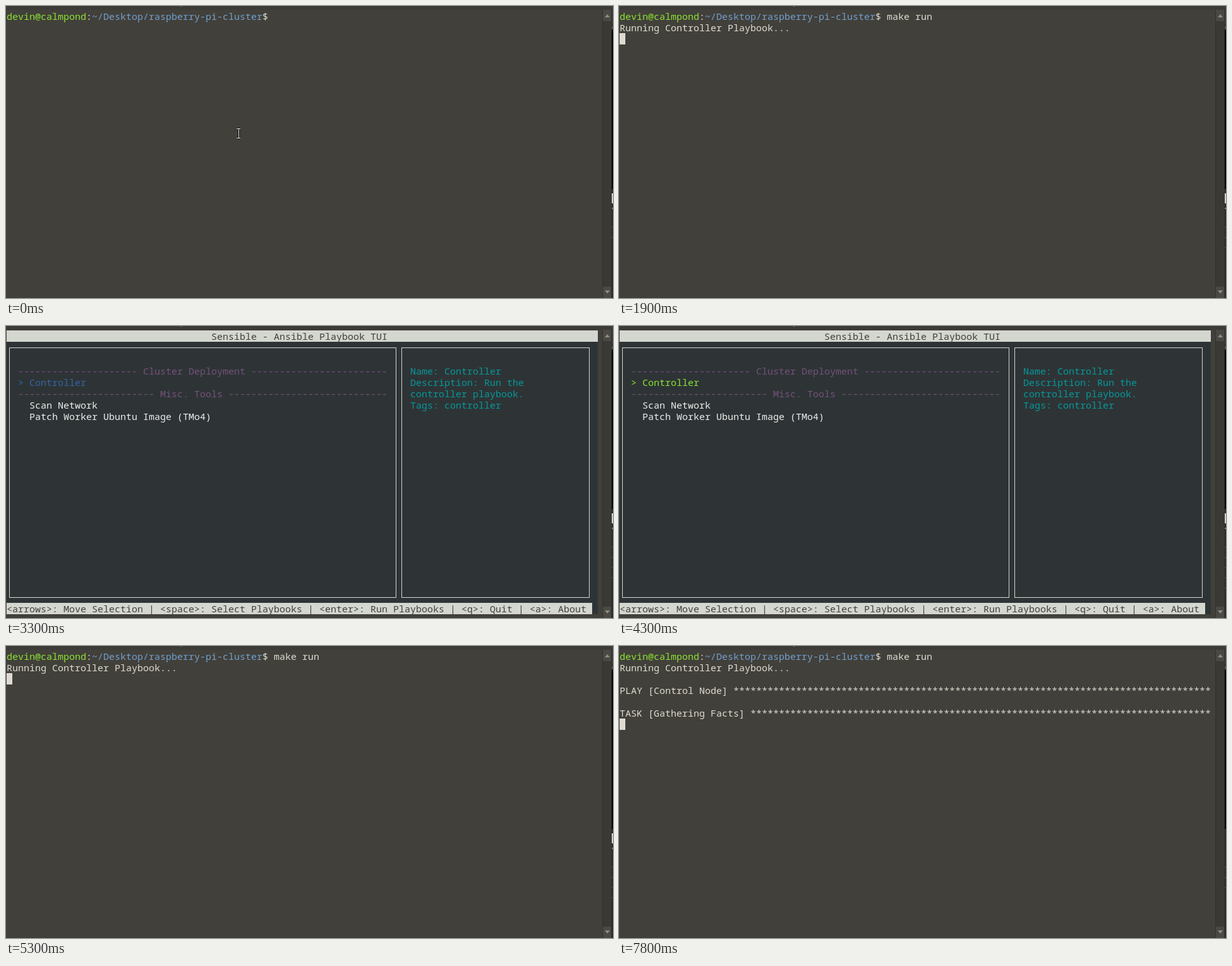
Recreate the animation shown at these times as an HTML page. Size 961 by 463 pixels, loop 8000 ms.

```html
<!DOCTYPE html>
<html lang="en">
<head>
<meta charset="utf-8">
<title>Terminal</title>
<style>
html, body { margin: 0; width: 100%; height: 100%; overflow: hidden; background: #3c3b37; }
#stage { position: relative; width: 961px; height: 463px; overflow: hidden; background: #3c3b37; }
#stage * { position: absolute; box-sizing: border-box; }
#stage span { position: static; }
.loop { animation: 8s step-end infinite; }

/* Character grid: 9 x 18 px cells starting at 1, 7 */
pre {
  margin: 0; left: 1px; color: #dfdbd2; white-space: pre;
  font: 15px/18px "Noto Sans Mono", monospace;
  font-variant-ligatures: none; font-kerning: none;
}
#term { left: 0; top: 6px; width: 945px; height: 456px; background: #42403a; }
#term pre { top: 1px; }
.user { color: #8ae234; }
.path { color: #729fcf; }
#stage #term .cmd { left: 424px; overflow: hidden; animation-name: type; }
#stage #term .run { top: 19px; animation-name: run; }
#stage #term .play { top: 55px; animation-name: play; }
#cursor { width: 9px; height: 18px; background: #dfdbd2; animation-name: cursor; }
#mouse { left: 363px; top: 192px; animation-name: mouse; }

@keyframes type {
  0% { width: 0 }
  5% { width: 9px }
  7.5% { width: 18px }
  8.75% { width: 36px }
  13.75% { width: 45px }
  18.75% { width: 54px }
  20% { width: 63px }
  21.25%, 100% { width: 72px }
}
@keyframes run { 0% { visibility: hidden } 23.75%, 100% { visibility: visible } }
@keyframes play { 0% { visibility: hidden } 73.75%, 100% { visibility: visible } }
@keyframes mouse { 0% { visibility: visible } 5%, 100% { visibility: hidden } }
@keyframes cursor {
  0% { left: 424px; top: 7px; visibility: hidden }
  5% { left: 433px; top: 7px; visibility: visible }
  7.5% { left: 442px; top: 7px; visibility: visible }
  8.75% { left: 460px; top: 7px; visibility: visible }
  13.75% { left: 469px; top: 7px; visibility: visible }
  18.75% { left: 478px; top: 7px; visibility: visible }
  20% { left: 487px; top: 7px; visibility: visible }
  21.25% { left: 496px; top: 7px; visibility: visible }
  23.75% { left: 1px; top: 43px; visibility: visible }
  25% { left: 1px; top: 43px; visibility: hidden }
  66.25% { left: 1px; top: 43px; visibility: visible }
  73.75% { left: 1px; top: 115px; visibility: hidden }
  81.25% { left: 1px; top: 115px; visibility: visible }
  88.75% { left: 1px; top: 115px; visibility: hidden }
  96.25%, 100% { left: 1px; top: 115px; visibility: visible }
}

#tui { left: 1px; top: 7px; width: 936px; height: 450px; background: #2e3436; animation-name: tui; }
#tui pre { left: 18px; color: #eeeeec; }
#tui .bar { left: 0; height: 18px; background: #d3d7cf; color: #42403a; }
.box { top: 27px; height: 397px; border: 1px solid #d3d7cf; }
#tui .sep { color: #75507b; }
#tui .sep.first { animation-name: sep; }
#tui .pick { animation-name: pick; }
#tui .info { left: 639px; top: 55px; color: #06989a; }
#stage .before { animation-name: before; }
#stage .after { animation-name: after; }
@keyframes tui { 0% { visibility: hidden } 25% { visibility: visible } 66.25%, 100% { visibility: hidden } }
@keyframes sep { 0% { color: #ad7fa8 } 41.25%, 100% { color: #75507b } }
@keyframes pick { 0% { color: #eeeeec } 41.25% { color: #3465a4 } 53.75%, 100% { color: #8ae234 } }
@keyframes before { 0% { opacity: 1 } 41.25%, 100% { opacity: 0 } }
@keyframes after { 0% { opacity: 0 } 41.25%, 100% { opacity: 1 } }

#scroll { left: 944px; top: 6px; width: 15px; height: 457px; background: #3a3934; border: solid #33322e; border-width: 0 1px; }
#scroll i { left: 0; width: 13px; height: 18px; background: #4a4943; }
#scroll i::after {
  content: ""; position: absolute; left: 3px; top: 7px;
  border: solid transparent; border-width: 0 4px 5px; border-bottom-color: #8f8d85;
}
#scroll .down { transform: scaleY(-1); }

/* Sliver of the neighbouring window */
#edge { left: 959px; top: 0; width: 2px; height: 463px; background: #2b2b29; }
#edge b { left: 0; width: 2px; }
#edge .knob { top: 297px; height: 16px; background: #d4d3cd; animation-name: knob; }
#edge .mark { top: 320px; height: 2px; background: #77766f; animation-name: knob; }
#edge .ticks {
  top: 350px; background: repeating-linear-gradient(#454440 0 2px, transparent 2px 16px);
  animation-name: ticks;
}
@keyframes knob { 0% { visibility: visible } 91.25%, 100% { visibility: hidden } }
@keyframes ticks {
  0% { height: 32px }
  18.75% { height: 36px }
  32.5% { height: 52px }
  43.75% { height: 68px }
  56.25% { height: 84px }
  61.25% { height: 68px }
  63.75% { height: 52px }
  71.25%, 100% { height: 36px }
}
</style>
</head>
<body>
<div id="stage">
  <b style="left:276px;top:0;width:2px;height:1px;background:#85837b"></b>
  <div id="term">
    <pre><span class="user">devin@calmpond</span>:<span class="path">~/Desktop/raspberry-pi-cluster</span>$</pre>
    <pre class="cmd loop">make run</pre>
    <pre class="run loop">Running Controller Playbook...</pre>
    <pre class="play loop" id="play"></pre>
  </div>
  <div id="cursor" class="loop"></div>

  <div id="tui" class="loop">
    <pre class="bar" style="top:0;width:936px;padding-left:324px">Sensible - Ansible Playbook TUI</pre>
    <div class="box" style="left:4px;width:613px"></div>
    <div class="box" style="left:625px;width:298px"></div>
    <pre class="sep first loop" style="top:55px" data-title="Cluster Deployment"></pre>
    <pre class="pick loop" style="top:73px"><span class="after loop">&gt;</span> Controller</pre>
    <pre class="sep" style="top:91px" data-title="Misc. Tools"></pre>
    <pre style="top:109px">  Scan Network
  Patch Worker Ubuntu Image (TMo4)</pre>
    <pre class="info before loop">Name: Cluster Deployment
Description: Plays used to
deploy the cluster.
Tags: seperator</pre>
    <pre class="info after loop">Name: Controller
Description: Run the
controller playbook.
Tags: controller</pre>
    <pre class="bar" style="top:432px;width:927px">&lt;arrows&gt;: Move Selection | &lt;space&gt;: Select Playbooks | &lt;enter&gt;: Run Playbooks | &lt;q&gt;: Quit | &lt;a&gt;: About</pre>
  </div>

  <svg id="mouse" class="loop" width="10" height="20" fill="none">
    <defs><path id="beam" d="M2 2.5H8M2 17.5H8M5.5 3V17"/></defs>
    <use href="#beam" stroke="#111" stroke-width="3"/>
    <use href="#beam" stroke="#f4f4f2"/>
  </svg>

  <div id="scroll"><i style="top:0"></i><i class="down" style="top:439px"></i></div>
  <div id="edge">
    <b style="top:0;height:30px;background:#3c3b37"></b>
    <b style="top:32px;height:4px;background:#55544f"></b>
    <b style="top:38px;height:252px;background:#000"></b>
    <b class="ticks loop"></b>
    <b class="mark loop"></b>
    <b class="knob loop"></b>
  </div>
</div>
<script>
// Fill the separator rows and the task headers to their full width
for (const row of document.querySelectorAll('[data-title]')) {
  const title = ` ${row.dataset.title} `;
  const left = Math.ceil((65 - title.length) / 2) - 2;
  row.textContent = ('-'.repeat(left) + title).padEnd(65, '-');
}
const header = text => (text + ' ').padEnd(104, '*');
document.getElementById('play').textContent =
  header('PLAY [Control Node]') + '\n\n' + header('TASK [Gathering Facts]');
</script>
</body>
</html>
```
